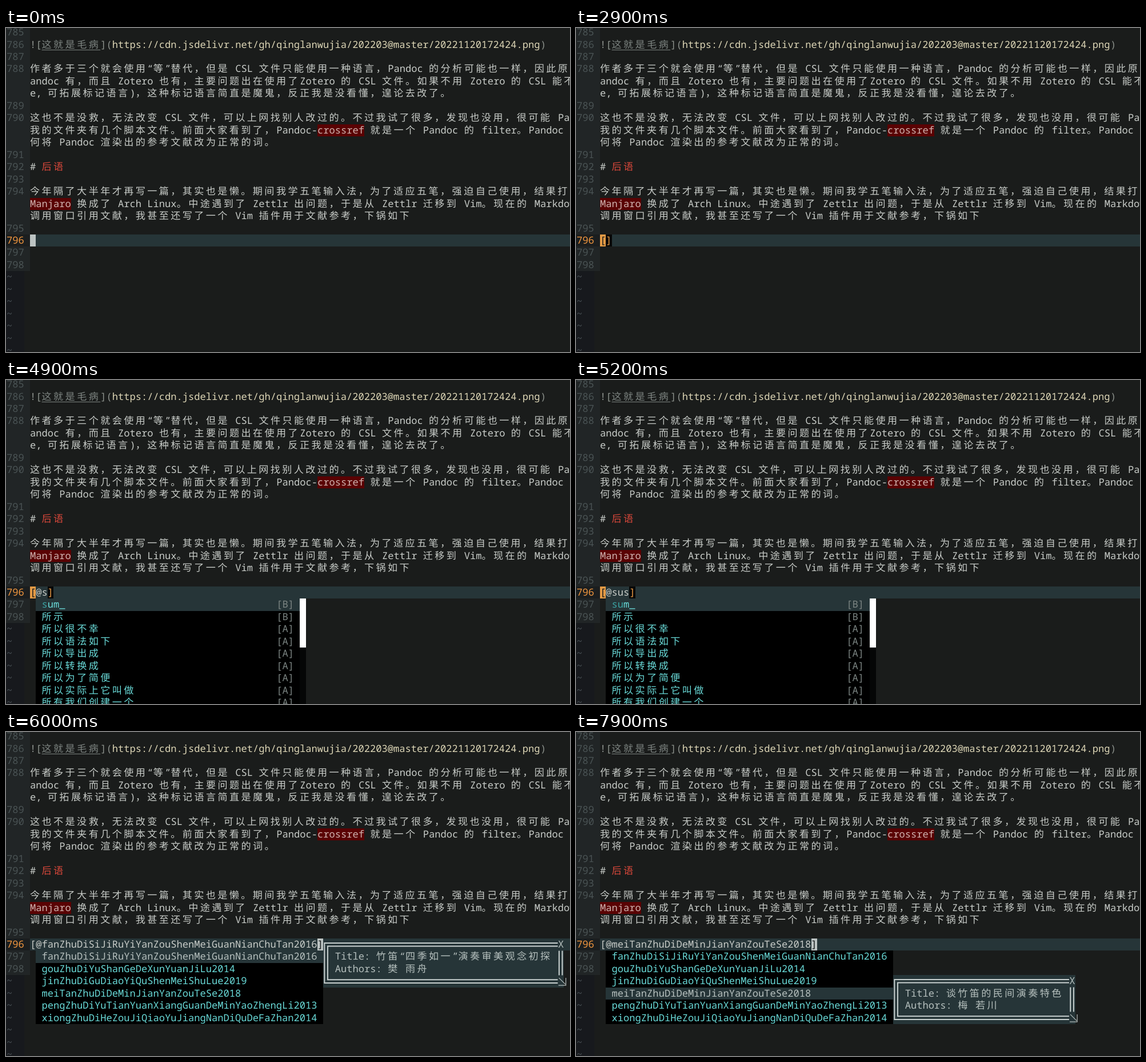
Animation, 987 px wide and 568 px high, one loop 8 s. Source, as an HTML page:

```html
<!DOCTYPE html>
<html lang="zh-CN">
<head>
<meta charset="utf-8">
<title>Editor</title>
<style>
  html, body { margin: 0; width: 100%; height: 100%; overflow: hidden; background: #1a1c1b; }
  #stage {
    position: relative; width: 987px; height: 568px; overflow: hidden;
    background: #1a1c1b; color: #c8ccc8;
    font: 17.108px "Noto Sans Mono", "Noto Sans CJK SC", "Noto Sans CJK", monospace;
    line-height: 21.463px; text-rendering: geometricPrecision;
    font-variant-ligatures: none;
  }
  #stage div { position: absolute; inset: 0; }
  #stage .box { inset: auto; }
  #stage span { position: absolute; white-space: pre; height: 21.463px; }
  #stage .wide { letter-spacing: 3.422px; }
  svg { position: absolute; overflow: visible; fill: none; }
  .num { color: #4a5354; }
  .now { color: #f0963f; }
  .tilde { color: #485055; }
  .dim { color: #8d928d; }
  .link { color: #7d8481; text-decoration: underline; text-underline-offset: 3px; }
  .url { color: #ddd6b6; }
  .head { color: #d9483b; }
  .bad { color: #d0b4b0; }
  .item { color: #69dad8; }
  .hit { color: #3aa3a3; }
  .kind { color: #7c8583; }
  .pick { color: #b6c0be; }
  .dark { color: #15191a; }
  .match { color: #ee9c45; }
</style>
</head>
<body>
<div id="stage"><div id="page"></div><div id="live"></div></div>
<script>
const CW = 10.265, RH = 21.463, LOOP = 8000;
const LINE = 17;                       // row of the edited line
const BAR = '#263538', CURSOR = '#bcc3c2', ORANGE = '#e39a45';
const page = document.getElementById('page');
const live = document.getElementById('live');

const X = col => 1 + (col + 4) * CW;   // column 0 is right of the gutter
const Y = row => row * RH - 2.9;
const WIDE = /[\u3000-\u9fff\uff00-\uffef]/;
const cells = s => [...s].reduce((n, ch) => n + (WIDE.test(ch) ? 2 : 1), 0);

function box(at, row, col, rows, cols, color) {
  const el = document.createElement('div');
  el.className = 'box';
  el.style.cssText = `left:${X(col)}px;top:${Y(row)}px;width:${cols * CW}px;height:${rows * RH}px;background:${color}`;
  at.append(el);
}

// Places text on the cell grid and returns the column after it.
function put(at, row, col, str, cls = '') {
  for (const run of str.match(/[\u3000-\u9fff\uff00-\uffef]+|[^\u3000-\u9fff\uff00-\uffef]+/g) || []) {
    const el = document.createElement('span');
    el.className = cls + (WIDE.test(run) ? ' wide' : '');
    el.style.left = X(col) + 'px';
    el.style.top = Y(row) + 'px';
    el.textContent = run;
    at.append(el);
    col += cells(run);
  }
  return col;
}

function drawPage() {
  box(page, 0, -5, 20, 5, '#212526');
  box(page, 20, -5, 8, 4, '#17191d');
  box(page, LINE, -5, 1, 5, '#1b1e1f');
  box(page, LINE, 0, 1, 93, BAR);

  [0, 1, 2, 3, 6, 7, 10, 11, 12, 13, 16, 17, 18, 19].forEach((row, i) =>
    put(page, row, -4, String(785 + i), row === LINE ? 'now' : 'num'));
  for (let row = 20; row < 27; row++) put(page, row, -4, '~', 'tilde');

  let col = put(page, 1, 0, '![', 'dim');
  col = put(page, 1, col, '这就是毛病', 'link');
  col = put(page, 1, col, '](', 'dim');
  col = put(page, 1, col, 'https://cdn.jsdelivr.net/gh/qinglanwujia/202203@master/20221120172424.png', 'url');
  put(page, 1, col, ')', 'dim');

  put(page, 3, 0, '作者多于三个就会使用“等”替代，但是 CSL 文件只能使用一种语言，Pandoc 的分析可能也一样，因此原');
  put(page, 4, 0, 'andoc 有，而且 Zotero 也有，主要问题出在使用了Zotero 的 CSL 文件。如果不用 Zotero 的 CSL 能不');
  put(page, 5, 0, 'e, 可拓展标记语言)，这种标记语言简直是魔鬼，反正我是没看懂，遑论去改了。');
  put(page, 7, 0, '这也不是没救，无法改变 CSL 文件，可以上网找别人改过的。不过我试了很多，发现也没用，很可能 Pandoc');

  col = put(page, 8, 0, '我的文件夹有几个脚本文件。前面大家看到了，Pandoc-');
  box(page, 8, col, 1, 8, '#5a0203');
  col = put(page, 8, col, 'crossref', 'bad');
  put(page, 8, col, ' 就是一个 Pandoc 的 filter。Pandoc ');
  put(page, 9, 0, '何将 Pandoc 渲染出的参考文献改为正常的词。');

  put(page, 11, 0, '#');
  put(page, 11, 2, '后语', 'head');

  put(page, 13, 0, '今年隔了大半年才再写一篇，其实也是懒。期间我学五笔输入法，为了适应五笔，强迫自己使用，结果打');
  box(page, 14, 0, 1, 7, '#5a0203');
  col = put(page, 14, 0, 'Manjaro', 'bad');
  put(page, 14, col, ' 换成了 Arch Linux。中途遇到了 Zettlr 出问题，于是从 Zettlr 迁移到 Vim。现在的 Markdown');
  put(page, 15, 0, '调用窗口引用文献，我甚至还写了一个 Vim 插件用于文献参考，下锅如下');
}

const cursor = col => box(live, LINE, col, 1, 1, CURSOR);

function typed(str) {
  put(live, LINE, 0, str);
  cursor(str.length);
}

// Bracket pair: the cursor inverts the highlight of the closing one.
function pair(inner, on = true) {
  const end = inner.length + 1;
  box(live, LINE, 0, 1, 1, ORANGE);
  put(live, LINE, 0, '[', 'dark');
  put(live, LINE, 1, inner);
  box(live, LINE, end, 1, 1, on ? '#060707' : ORANGE);
  put(live, LINE, end, ']', on ? 'match' : 'dark');
}

function menu(items, col, cols, hit, kinds) {
  box(live, LINE + 1, col, items.length, cols, '#000');
  box(live, LINE + 1, col, 1, cols, BAR);
  items.forEach((name, i) => {
    const row = LINE + 1 + i;
    const n = name.startsWith(hit) ? hit.length : 0;
    put(live, row, col + 1, name.slice(0, n), 'hit');
    put(live, row, col + 1 + n, name.slice(n), 'item');
    put(live, row, col + cols - 4, `[${kinds[i] || 'A'}]`, 'kind');
  });
}

const words = () => menu(
  ['id', 'io', 'in', 'images', 'index_img', 'identifier', 'installing'], -1, 16, 'i', '');

function phrases(inner) {
  pair(inner);
  menu(['sum_', '所示', '所以很不幸', '所以语法如下', '所以导出成', '所以转换成',
    '所以为了简便', '所以实际上它叫做', '所有我们创建一个'], 1, 45, inner.slice(1, 3), 'BB');
  box(live, LINE + 1, 46, 9, 1, '#050606');
  box(live, LINE + 1, 46, 4, 1, '#fff');
}

const refs = [
  ['fanZhuDiSiJiRuYiYanZouShenMeiGuanNianChuTan2016', '竹笛“四季如一”演奏审美观念初探', '樊 雨舟'],
  ['gouZhuDiYuShanGeDeXunYuanJiLu2014', '竹笛与山歌的寻源记录', '苟 云溪'],
  ['jinZhuDiGuDiaoYiQuShenMeiShuLue2019', '竹笛古调意趣审美述略', '靳 知秋'],
  ['meiTanZhuDiDeMinJianYanZouTeSe2018', '谈竹笛的民间演奏特色', '梅 若川'],
  ['pengZhuDiYuTianYuanXiangGuanDeMinYaoZhengLi2013'],
  ['xiongZhuDiHeZouJiQiaoYuJiangNanDiQuDeFaZhan2014']
];

function info(row, title, author) {
  const cols = cells('Title: ' + title) + 4;
  const w = cols * CW, h = 4 * RH, c = CW / 2, m = RH / 2, d = 2.8;
  box(live, row, 50, 4, cols, BAR);
  const side = k => `M${w - CW} ${m - k}H${c - k}V${h - m + k}H${w - CW}M${w - c + k} ${RH}V${h - RH}`;
  live.insertAdjacentHTML('beforeend',
    `<svg width="${w}" height="${h}" style="left:${X(50)}px;top:${Y(row)}px">
      <path d="${side(d)}${side(-d)}" stroke="#c8d0cf" stroke-width="2"/>
      <path d="M${w - c - 3} ${h - m - 6}l11 11M${w - c + 9} ${h - m - 6}v13h-13" stroke="#b4bebd" stroke-width="1.2"/>
    </svg>`);
  put(live, row, 50 + cols - 1, 'X', 'pick');
  put(live, row + 1, 52, 'Title: ' + title, 'pick');
  put(live, row + 2, 52, 'Authors: ' + author, 'pick');
}

function cite(pick, withInfo = true) {
  const [key, title, author] = refs[pick];
  put(live, LINE, 0, '[@' + key);
  cursor(key.length + 2);
  put(live, LINE, key.length + 2, ']', 'dark');
  box(live, LINE + 1, 1, refs.length, 49, '#000');
  box(live, LINE + 1 + pick, 1, 1, 49, BAR);
  refs.forEach(([name], i) => put(live, LINE + 1 + i, 2, name, i === pick ? 'pick' : 'item'));
  if (withInfo) info(LINE + pick, title, author);
}

const steps = [
  [0, () => cursor(0)],
  [500, () => {}],
  [900, () => typed('i')],
  [1000, () => { typed('i'); words(); }],
  [1500, () => typed('i')],
  [1600, () => cursor(0)],
  [2200, () => {}],
  [2700, () => cursor(0)],
  [2800, () => pair('')],
  [3600, () => pair('@')],
  [4100, () => pair('@', false)],
  [4700, () => pair('@')],
  [4900, () => phrases('@s')],
  [5100, () => phrases('@su')],
  [5200, () => phrases('@sus')],
  [5900, () => cite(0, false)],
  [6000, () => cite(0)],
  [6600, () => cite(1)],
  [7200, () => cite(2)],
  [7700, () => cite(3)]
];

let shown = -1;
const start = performance.now();
function tick() {
  const t = (performance.now() - start) % LOOP;
  const i = steps.filter(([at]) => at <= t).length - 1;
  if (i !== shown) {
    shown = i;
    live.replaceChildren();
    steps[i][1]();
  }
  requestAnimationFrame(tick);
}

drawPage();
tick();
</script>
</body>
</html>
```
